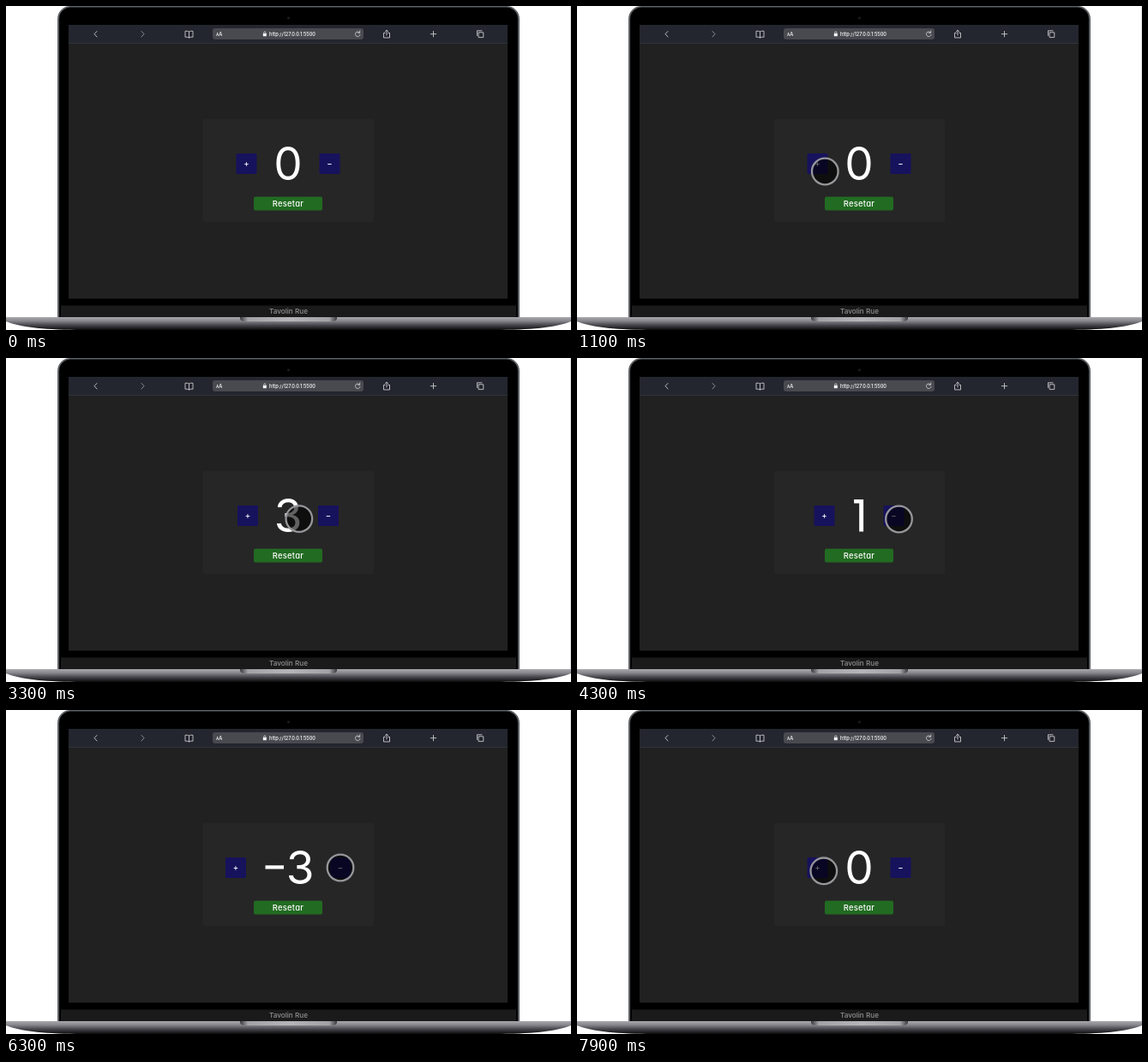
Recreate the animation shown at these times as an HTML page. Size 659 px wide and 378 px high, loop 8000 ms.

```html
<!DOCTYPE html>
<html lang="pt">
<head>
<meta charset="utf-8">
<title>Contador</title>
<style>
  html, body { margin: 0; width: 100%; height: 100%; overflow: hidden; background: #fff; }
  svg { display: block; width: 100vw; height: 100vh; }
  text { font-family: Inter, "Open Sans", sans-serif; text-anchor: middle; fill: #fff; }
  .icon { fill: none; stroke: #c9cacd; stroke-width: .9; stroke-linecap: round; stroke-linejoin: round; }
  .dim { stroke: #96989c; }
  .digit { font-size: 53px; }
  .sign { font-size: 9.5px; font-weight: 500; }
  .reset { font-size: 9.4px; font-weight: 500; letter-spacing: .25px; font-feature-settings: "cv11"; }
  .label { font-size: 8.2px; font-weight: 500; fill: #929295; }
  .btn { fill: #17125c; }
</style>
</head>
<body>
<svg viewBox="0 0 659 378">
  <defs>
    <linearGradient id="base" x2="0" y2="1">
      <stop offset="0" stop-color="#a9a9ae"/>
      <stop offset=".3" stop-color="#85858b"/>
      <stop offset=".6" stop-color="#4a4a50"/>
      <stop offset="1" stop-color="#0a0a0c"/>
    </linearGradient>
    <linearGradient id="notch">
      <stop offset="0" stop-color="#38383c"/>
      <stop offset=".08" stop-color="#a2a2a6"/>
      <stop offset=".5" stop-color="#b5b5b9"/>
      <stop offset=".92" stop-color="#a2a2a6"/>
      <stop offset="1" stop-color="#38383c"/>
    </linearGradient>
  </defs>

  <!-- laptop -->
  <rect x="658" width="1" height="364" fill="#ddd"/>
  <rect x="60" y="0" width="539" height="380" rx="15" fill="#5d6063"/>
  <rect x="62" y="1.5" width="535" height="380" rx="13.5" fill="#000"/>
  <rect y="363" width="659" height="15" fill="#fff"/>
  <rect x="64" y="349.5" width="531" height="13.5" fill="#1a1a1b"/>
  <circle cx="329.5" cy="14" r="1.6" fill="#1b1c22"/>
  <path d="M0 363H659V368C642 375 610 378 570 378H89C49 378 17 375 0 368Z" fill="url(#base)"/>
  <path d="M273 363H386V364Q386 368 380 368H279Q273 368 273 364Z" fill="url(#notch)"/>
  <text class="label" x="329.5" y="359.3">Tavolin Rue</text>

  <!-- browser -->
  <rect x="73" y="22" width="512" height="319.5" fill="#212121"/>
  <rect x="73" y="22" width="512" height="22" fill="#23262e"/>
  <rect x="73" y="43" width="512" height="1" fill="#30333a"/>
  <rect x="241" y="26" width="176" height="13" rx="3" fill="#484a50"/>
  <text x="248.8" y="34.8" font-size="5.8" font-weight="500"><tspan font-size="4.6">A</tspan>A</text>
  <text x="334" y="34.5" font-size="5.6" font-weight="500">http://127.0.0.1:5500</text>
  <rect x="299.8" y="32" width="4" height="3.2" rx=".5" fill="#fff"/>
  <g class="icon">
    <path d="M300.7 32V31a1.1 1.1 0 0 1 2.2 0V32"/>
    <path d="M106 29.5L103 32.7L106 36"/>
    <path class="dim" d="M158 29.5L161 32.7L158 36"/>
    <path d="M213.5 30Q211.5 28.8 209 29.3V36.3Q211.5 35.8 213.5 37Q215.5 35.8 218 36.3V29.3Q215.5 28.8 213.5 30V37"/>
    <path d="M412.4 31A2.8 2.8 0 1 0 413 33.4M412.7 29V31.3H410.5"/>
    <path d="M442 31.5H440.5V37H447.5V31.5H446M444 34V28.3M442.2 30L444 28.2L445.8 30"/>
    <path d="M495.3 32.7H501.7M498.5 29.5V35.9"/>
    <path d="M551.5 30.8H556.8V36.6H551.5ZM549.5 34.5V28.8H555"/>
  </g>

  <!-- counter -->
  <rect x="229.5" y="132" width="199.5" height="120" rx="2" fill="#262626"/>
  <g id="plus">
    <rect class="btn" x="-12" y="172" width="24" height="24" rx="1.5"/>
    <text class="sign" y="187.2">+</text>
  </g>
  <g id="less">
    <rect class="btn" x="-12" y="172" width="24" height="24" rx="1.5"/>
    <text class="sign" y="187.2">−</text>
  </g>
  <rect id="bar" y="181.3" width="21.5" height="4.2" fill="#fff"/>
  <path id="one" d="M-5.5 165H5.5V202.4H.6V169.4H-5.5Z" fill="#fff"/>
  <text id="digit" class="digit" y="202.6"></text>
  <rect x="289" y="222.5" width="80" height="16" rx="2" fill="#226b22"/>
  <text class="reset" x="329" y="233.9">Resetar</text>

  <circle id="touch" fill="#000" fill-opacity=".62" stroke="#96969a" stroke-width="2.3"/>
</svg>
<script>
  const LOOP = 8000, STEP = 100, MID = 329, MARGIN = 20, BUTTON = 24;
  const [plus, less, bar, one, digit, touch] =
    ["plus", "less", "bar", "one", "digit", "touch"].map(id => document.getElementById(id));

  const widths = [33, 17, 29, 30], signWidth = 28;

  const taps = [
    { times: [1800, 2200, 2600], apply: n => n + 1 },
    { times: [3600, 3900, 4600, 4900, 5900, 6300], apply: n => n - 1 },
    { times: [7300], apply: () => 0 },
  ].flatMap(({ times, apply }) => times.map(time => ({ time, apply })));

  // each glide eases from wherever the pointer is
  const entry = { x: 391, y: 231, time: 100 };
  const glides = [
    { from: 100, to: 1100, x: 289.3, y: 193 },
    { from: 1100, to: 2300, x: 290, y: 187 },
    { from: 2900, to: 3600, x: 375.5, y: 188 },
    { from: 4900, to: 5700, x: 390, y: 184 },
    { from: 6400, to: 7200, x: 340, y: 230 },
    { from: 7500, to: 7900, x: 287.8, y: 187.8 },
  ];

  const move = (node, x, y = 0) => node.setAttribute("transform", `translate(${x} ${y})`);
  const show = (node, on) => node.setAttribute("visibility", on ? "visible" : "hidden");

  function ease(t, from, to) {
    const k = Math.min(1, Math.max(0, (t - from) / (to - from)));
    return k * k * (3 - 2 * k);
  }

  function drawCount(n) {
    const d = Math.abs(n), lead = n < 0 ? signWidth : 0;
    const half = (widths[d] + lead) / 2 + MARGIN;
    const x = MID + lead / 2;
    move(plus, MID - half - BUTTON / 2);
    move(less, MID + half + BUTTON / 2);
    show(bar, n < 0);
    move(bar, MID - half + MARGIN + 2.5);
    show(one, d === 1);
    move(one, x - .4);
    digit.textContent = d === 1 ? "" : d;
    digit.setAttribute("x", x);
  }

  function drawTouch(t) {
    const at = glides.reduce((p, g) => {
      const k = ease(t, g.from, g.to);
      return { x: p.x + (g.x - p.x) * k, y: p.y + (g.y - p.y) * k };
    }, entry);
    // the ring tightens just before a tap lands
    const pressed = taps.some(({ time }) => t >= time - STEP && t < time);
    show(touch, t >= entry.time);
    touch.setAttribute("r", pressed ? 14.6 : 15.3);
    move(touch, at.x, at.y);
  }

  function draw(now) {
    const t = Math.floor((now % LOOP) / STEP) * STEP;
    drawCount(taps.filter(tap => tap.time <= t).reduce((n, tap) => tap.apply(n), 0));
    drawTouch(t);
  }

  const start = performance.now();
  function tick() {
    draw(performance.now() - start);
    requestAnimationFrame(tick);
  }
  tick();
</script>
</body>
</html>
```
